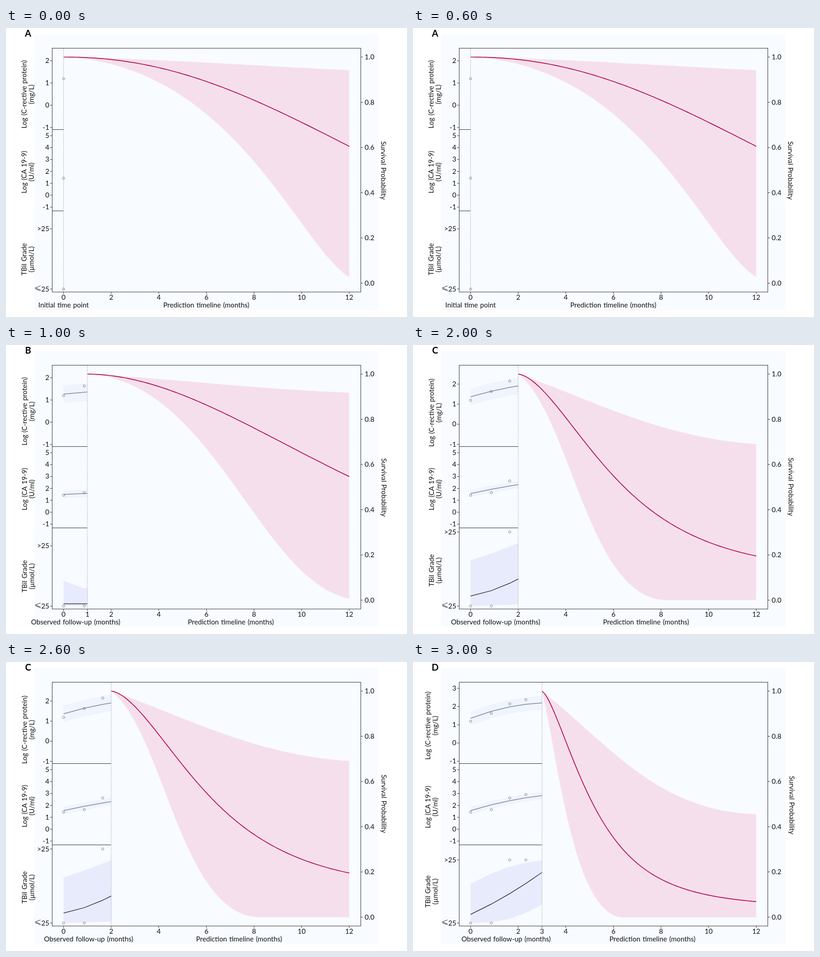
Recreate the animation shown at these times as an HTML page. Size 881x636 px, loop 4000 ms.

```html
<!DOCTYPE html>
<html lang="en">
<head>
<meta charset="utf-8">
<title>Survival prediction over follow-up</title>
<style>
  html, body { margin: 0; width: 100%; height: 100%; overflow: hidden; background: #fff; }
  svg { display: block; width: 881px; height: 636px; }
  text { font: 15.2px Lato, "Open Sans", sans-serif; word-spacing: 1px; fill: #111; text-anchor: middle; }
  .start { text-anchor: start; }
  .end { text-anchor: end; }
  .letter { font-size: 20px; font-weight: bold; fill: #000; }
  .axis { fill: none; stroke: #2b2b2b; }
  .now { stroke: #666; stroke-dasharray: 1.2 2.6; }
  .dot { fill: none; stroke: #6f7078; stroke-width: .9; }
  .risk { fill: #f6dfec; }
  .curve { fill: none; stroke: #b0033c; stroke-width: 1.7; }
  .band { fill: #eff4fd; }
  .band.grade { fill: #e8ebfb; }
  .fit { fill: none; stroke: #7d8498; stroke-width: 1.5; }
  .fit.grade { stroke: #303344; }
</style>
</head>
<body>
<svg id="stage" viewBox="0 0 881 636"></svg>
<script>
const RIGHT = 754, FLOOR = 574.5;
const visits = [126.5, 172, 212.5, 248];
const names = [['Log (C-rective protein)', '(mg/L)'], ['Log (CA 19-9)', '(U/ml)'], ['TBil Grade', '(µmol/L)']];
const measured = [[1.19, 1.63, 2.15, 2.38], [1.43, 1.64, 2.63, 2.92], [0, 0, 1, 1]];

// crp: top tick, its y, tick spacing. high: y of the upper grade.
// fits: [start y, end y, bow], then half the band's height or its two edges.
// survival: [limit, scale, shape]. upper, lower: control points and end of the risk band.
const panels = [
  {
    letter: 'A', past: ['Initial time point', 126.5], future: 440,
    crp: [2, 72, 49], high: 442, labels: [146, 317, 509], shift: 0, side: [824, 313.5],
    fits: [], survival: [20, 66.2, 2.15],
    upper: [[300, 66], [550, 83], [RIGHT, 93]],
    lower: [[500, 80], [643, 480], [RIGHT, 548]]
  },
  {
    letter: 'B', past: ['Observed follow-up (months)', 153], future: 494,
    crp: [2, 72, 49], high: 442, labels: [146, 317, 509], shift: 1, side: [825, 313.5],
    fits: [[[108, 103.5, 0], 19], [[328.7, 326.5, 0], 8], [[569.5, 569.5, 0], [519, 533, 40], [574, 574, 0]]],
    survival: [3, 24.13, 1.9],
    upper: [[340, 72], [560, 98], [RIGHT, 105]],
    lower: [[455, 78], [555, 515], [RIGHT, 558.5]]
  },
  {
    letter: 'C', past: ['Observed follow-up (months)', 181.5], future: 512,
    crp: [2, 86, 44.2], high: 411.5, labels: [149, 317, 496], shift: 1, side: [825, 312],
    fits: [[[114, 90, -7], 18], [[327, 307.3, -4], 8], [[552.5, 515, 18], [474, 436, 5], [574, 571, 2]]],
    survival: [2.1, 7.79, 1.64],
    upper: [[385, 116], [540, 204], [RIGHT, 218]],
    lower: [[348, 155], [385, 565], [560, 561.5]]
  },
  {
    letter: 'D', past: ['Observed follow-up (months)', 204.5], future: 526,
    crp: [3, 58, 40.1], high: 435.5, labels: [140, 319, 505], shift: -7, side: [827, 315],
    fits: [[[124, 90, -27], 15], [[327, 294, -15], 8], [[555.5, 463, 20], [488, 436.5, -37], [574, 534, 52]]],
    survival: [3.1, 5.565, 1.44],
    upper: [[432, 182], [535, 328], [RIGHT, 335]],
    lower: [[320, 215], [353, 572], [468, 562]]
  }
];

const monthX = m => 126.5 + 52.3 * m;
const probY = p => 561.5 - 497.5 * p;
const path = (cls, d) => `<path class="${cls}" d="${d}"/>`;
const text = (x, y, s, cls = '') => `<text x="${x}" y="${y}" class="${cls}">${s}</text>`;
const turned = (x, y, s, angle) => `<text transform="translate(${x} ${y}) rotate(${angle})">${s}</text>`;
const leftTick = (y, label) => path('axis', `M97 ${y}H101`) + text(95, y + 5, label, 'end');

const scales = ({ crp: [top, y, step], high }) => [
  v => y + (top - v) * step,
  v => 237 + (5 - v) * 26.2,
  v => FLOOR + (high - FLOOR) * v
];

function axes(p, now) {
  const x = monthX(now), [crpY, caY, gradeY] = scales(p);
  let out = '<rect class="axis" x="101.5" y="44.5" width="678" height="536.5"/>' +
    path('axis', `M101 223.5H${x}M101 402.5H${x}`) + path('now', `M${x} 45V580`);
  for (let v = -1; v <= p.crp[0]; v++) out += leftTick(crpY(v), v);
  for (let v = -1; v <= 5; v++) out += leftTick(caY(v), v);
  out += leftTick(gradeY(1), '&gt;25') + leftTick(FLOOR, '25');
  out += path('axis', 'M76 567.5L64.5 572L76 576.5M64.5 574L76 578.5');
  for (let v = 0; v <= 5; v++) {
    const y = probY(v / 5);
    out += path('axis', `M779 ${y}H784`) + text(788, y + 5, (v / 5).toFixed(1), 'start');
  }
  for (const m of new Set([0, 2, 4, 6, 8, 10, 12, now]))
    out += path('axis', `M${monthX(m)} 581V585`) + text(monthX(m), 598, m);
  return out;
}

function titles(p) {
  const left = names.map((lines, i) =>
    lines.map((s, row) => turned(45 + 15.5 * row + p.shift, p.labels[i], s, -90)).join(''));
  return text(48.5, 19, p.letter, 'letter') + text(p.past[1], 615, p.past[0]) +
    text(p.future, 615, 'Prediction timeline (months)') + left.join('') +
    turned(...p.side, 'Survival Probability', 90);
}

function history(p, now) {
  const xs = visits.slice(0, now + 1), ends = [...xs, monthX(now)];
  const trace = ([from, to, bow], offset = 0) => ends.map(x => {
    const u = (x - xs[0]) / (monthX(now) - xs[0]);
    return [x, from + (to - from) * u + bow * u * (1 - u) + offset];
  });
  const fits = p.fits.map(([mid, up, low], i) => {
    const kind = i === 2 ? ' grade' : '';
    const top = low ? trace(up) : trace(mid, -up);
    const bottom = low ? trace(low) : trace(mid, up);
    return path('band' + kind, `M${[...top, ...bottom.reverse()].join('L')}Z`) +
      path('fit' + kind, 'M' + trace(mid).join('L'));
  });
  const dots = scales(p).flatMap((y, i) =>
    xs.map((x, k) => `<circle class="dot" cx="${x}" cy="${y(measured[i][k])}" r="2.5"/>`));
  return fits.join('') + dots.join('');
}

function forecast({ survival: [limit, scale, shape], upper, lower }, now) {
  const start = [monthX(now), probY(1)], [c1, c2, end] = lower;
  const line = [];
  for (let m = now; m <= 12; m += 0.125) {
    const hazard = limit * (1 - Math.exp(-(((m - now) / scale) ** shape)));
    line.push([monthX(m), probY(Math.exp(-hazard))]);
  }
  return path('risk', `M${start}C${upper.join(' ')}V${end[1]}H${end[0]}C${c2} ${c1} ${start}Z`) +
    path('curve', 'M' + line.join('L'));
}

const stage = document.getElementById('stage');
stage.innerHTML = '<rect x="62" y="14" width="756.5" height="607" fill="#f8fbff"/>' +
  panels.map((p, now) => `<g>${forecast(p, now)}${history(p, now)}${axes(p, now)}${titles(p)}</g>`).join('');
const groups = stage.querySelectorAll('g');

function draw() {
  const shown = Math.floor(performance.now() / 1000) % panels.length;
  groups.forEach((g, i) => g.style.display = i === shown ? '' : 'none');
  requestAnimationFrame(draw);
}
draw();
</script>
</body>
</html>
```
